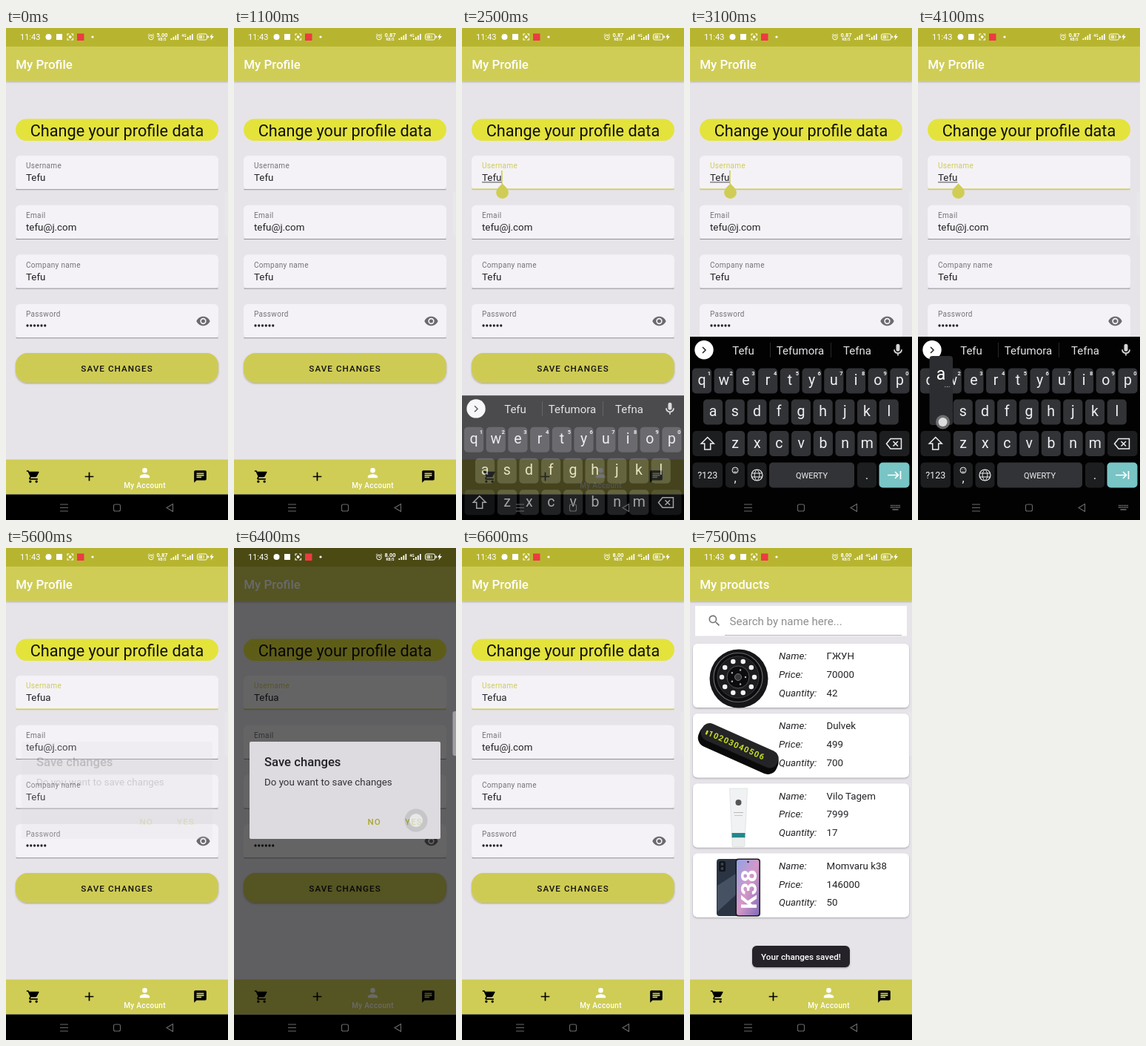
Write an HTML page that moves like this. It is 300 px wide and 663 px high and loops after 8 s.

```html
<!DOCTYPE html>
<html lang="en">
<head>
<meta charset="utf-8">
<style>
html, body { margin: 0; width: 100%; height: 100%; overflow: hidden; background: #000; }
svg { display: block; width: 100vw; height: 100vh; font-family: Roboto, "Noto Sans", sans-serif; }
</style>
</head>
<body>
<svg id="stage" viewBox="0 0 300 663"></svg>
<script>
const LOOP = 8000, STEP = 100;
const OLIVE = '#cfcd56', PAGE = '#e6e4e8', FIELD = '#f4f2f6', INK = '#232226';
const NAME = 'Tefu', TYPED = NAME + 'a';

const rect = (x, y, w, h, fill, r = 0, more = '') =>
  `<rect x="${x}" y="${y}" width="${w}" height="${h}" rx="${r}" fill="${fill}" ${more}/>`;
const circle = (x, y, r, fill, more = '') =>
  `<circle cx="${x}" cy="${y}" r="${r}" fill="${fill}" ${more}/>`;
const text = (x, y, size, fill, str, more = '') =>
  `<text x="${x}" y="${y}" font-size="${size}" fill="${fill}" ${more}>${str}</text>`;
const line = (d, color, width = 1, more = '') =>
  `<path d="${d}" fill="none" stroke="${color}" stroke-width="${width}" ${more}/>`;
const group = (id, body, more = '') => `<g id="${id}" ${more}>${body}</g>`;
const MID = 'text-anchor="middle"', MEDIUM = 'font-weight="500"', BOLD = 'font-weight="700"';
const CAPS = MEDIUM + ' letter-spacing="1.04"', SHADOW = 'filter="url(#shadow)"';

// 24-unit icons drawn 20 px wide around a centre
const ICONS = {
  eye: 'M12 4.5C7 4.5 2.73 7.61 1 12c1.73 4.39 6 7.5 11 7.5s9.27-3.11 11-7.5c-1.73-4.39-6-7.5-11-7.5zM12 17a5 5 0 1 1 0-10 5 5 0 0 1 0 10zm0-8a3 3 0 1 0 0 6 3 3 0 0 0 0-6z',
  cart: 'M7 18a2 2 0 1 0 0 4 2 2 0 0 0 0-4zM1 2v2h2l3.6 7.59-1.35 2.45C4.5 15.4 5.5 17 7 17h12v-2H7.42a.25.25 0 0 1-.22-.37l.9-1.63h7.45c.75 0 1.41-.41 1.75-1.03l3.58-6.49A1 1 0 0 0 20 4H5.21l-.94-2H1zm16 16a2 2 0 1 0 0 4 2 2 0 0 0 0-4z',
  plus: 'M19 13h-6v6h-2v-6H5v-2h6V5h2v6h6v2z',
  person: 'M12 12a4 4 0 1 0 0-8 4 4 0 0 0 0 8zm0 2c-2.67 0-8 1.34-8 4v2h16v-2c0-2.66-5.33-4-8-4z',
  chat: 'M20 2H4a2 2 0 0 0-2 2v18l4-4h14a2 2 0 0 0 2-2V4a2 2 0 0 0-2-2zM6 9h12v2H6V9zm8 5H6v-2h8v2zm4-6H6V6h12v2z',
  search: 'M15.5 14h-.8l-.3-.3a6.5 6.5 0 1 0-.7.7l.3.3v.8l5 5 1.5-1.5-5-5zm-6 0a4.5 4.5 0 1 1 0-9 4.5 4.5 0 0 1 0 9z',
  mic: 'M12 14a3 3 0 0 0 3-3V5a3 3 0 0 0-6 0v6a3 3 0 0 0 3 3zm5-3a5 5 0 0 1-10 0H5a7 7 0 0 0 6 6.92V21h2v-3.08A7 7 0 0 0 19 11h-2z'
};
const icon = (name, x, y, fill) =>
  `<path d="${ICONS[name]}" fill="${fill}" fill-rule="evenodd" transform="translate(${x - 10} ${y - 10}) scale(.8333)"/>`;

function field(i, label, value, id) {
  const y = 172 + 66.67 * i;
  return rect(13, y, 274, 46, FIELD, 6) +
    rect(13.5, y + 45.3, 273, .9, '#88868a', 0, `id="${id}Line"`) +
    text(27, y + 17.3, 10, '#747278', label, `letter-spacing=".33" id="${id}Label"`) +
    text(27, y + 34.2, 13.33, INK, value, `id="${id}Text"`);
}

function profilePage() {
  const dots = [0, 1, 2, 3, 4, 5].map(i => circle(29 + 4.75 * i, 401, 1.65, INK)).join('');
  return rect(13, 122.5, 274, 29.5, '#e4e33c', 14.75) +
    text(150, 146, 21.67, '#111', 'Change your profile data', MID) +
    field(0, 'Username', NAME, 'user') + field(1, 'Email', 'tefu@j.com', 'mail') +
    field(2, 'Company name', NAME, 'firm') + field(3, 'Password', '', 'pass') + dots +
    icon('eye', 266.5, 395, '#6c6a70') +
    rect(13, 438, 274, 40, '#cecb55', 16, SHADOW) +
    text(101.3, 463, 11.67, '#111', 'SAVE CHANGES', CAPS) +
    group('handle', `<path d="M54.5 209.5l6 6.2a8.4 8.4 0 1 1-12 0z" fill="${OLIVE}"/>`) +
    rect(0, 192, 1.6, 18, OLIVE, 0, 'id="cursor"') +
    rect(27, 207.5, 27.5, .8, INK, 0, 'id="compose"');
}

function wheel() {
  const ring = (r, color, width, n) => circle(65, 174, r, 'none',
    `stroke="${color}" stroke-width="${width}" stroke-linecap="round" pathLength="${n}" stroke-dasharray="0 1"`);
  return circle(66, 176, 39.5, '#161618') +
    circle(65, 174.5, 33, '#0c0c0e', 'stroke="#6a6a6e" stroke-width="1.2"') +
    circle(65, 174, 28, '#1d1d20', 'stroke="#3a3a3e"') + ring(22, '#f2f2f3', 6.5, 10) +
    circle(65, 174, 15, '#0c0c0e', 'stroke="#55565a"') + ring(10, '#b4b4b8', 2.5, 5) +
    circle(65, 174, 4.5, '#38383b', 'stroke="#77777b"');
}
const plate = () => `<g transform="translate(66 269) rotate(24)">` +
  rect(-57, -12, 115, 30, '#0a0a0b', 13) + rect(-56, -15, 112, 24, '#242426', 11) +
  rect(-49, -4, 2.5, 6, '#c6dc28', 1) +
  text(-4, 2, 11, '#c6dc28', '10203040506', MID + ' ' + BOLD + ' letter-spacing="1.2"') + '</g>';
const tube = () => '<path d="M53.5 324h24l-3 62H56.500z" fill="#f0f2f3" stroke="#dcdfe0" stroke-width=".8"/>' +
  circle(65.5, 343, 4, '#555') + rect(59, 356, 13, .8, '#aaa') + rect(60, 360, 11, .8, '#bbb') +
  rect(56.5, 384, 18, 6.500, '#23878d') + rect(57, 390.500, 17, 12, '#eceeee', 1.500, 'stroke="#d3d6d6" stroke-width=".6"');
const phones = () => rect(36, 419, 33, 77, '#2b3442', 4) + '<path d="M37 455l31-20v27l-31 28z" fill="#465264"/>' +
  rect(39, 422, 9, 14, '#11151c', 2.5) + circle(43.5, 426, 2, '#3b4350') + circle(43.5, 432, 2, '#3b4350') +
  rect(61.5, 418.5, 33.5, 78, '#17171c', 4) + rect(63, 420, 30.5, 75, 'url(#screen)', 3) +
  circle(78.5, 423, 1.2, '#222') +
  text(0, 0, 30, '#fff', 'K38', BOLD + ' text-anchor="middle" transform="translate(90 460) rotate(-90)"');

function productsPage() {
  const goods = [['ГЖУН', 70000, 42, wheel], ['Dulvek', 499, 700, plate],
    ['Vilo Tagem', 7999, 17, tube], ['Momvaru k38', 146000, 50, phones]];
  const cards = goods.map(([name, price, count, art], i) => {
    const y = 129 + 94.2 * i;
    const rows = [['Name:', name], ['Price:', price], ['Quantity:', count]].map(([key, value], j) =>
      text(120, y + 21.2 + 24.8 * j, 13.33, INK, key, 'font-style="italic"') +
      text(184.5, y + 21.2 + 24.8 * j, 13.33, INK, value)).join('');
    return rect(4, y, 292, 86, '#fff', 6, SHADOW) + art() + rows;
  }).join('');
  return rect(7, 78, 286, 40.5, '#fff') + icon('search', 33, 98, '#757575') +
    text(53.5, 104, 15.1, '#8e8e8e', 'Search by name here...') + rect(47, 117, 239, .8, '#a5a5a8') + cards +
    group('toast', rect(84, 536, 132, 29, '#252429', 6, SHADOW) +
      text(150, 554.7, 11.67, '#fff', 'Your changes saved!', MID + ' ' + MEDIUM));
}

function statusBar() {
  const bars = x => [0, 1, 2, 3].map(i => rect(x + 3 * i, 14 - 2 * i, 1.7, 2 + 2 * i, '#fff')).join('');
  return text(19, 16, 11, '#fff', '11:43') + circle(57.5, 12, 4, '#fff') + rect(68, 8, 8, 8, '#fff') +
    line('M83 10.5v-2.5h2.5M88 8h2.5v2.5M90.5 13.5v2.5h-2.5M85.5 16h-2.5v-2.5', '#fff', 1.1) +
    circle(86.7, 12, 1.9, '#fff') + rect(96, 7.5, 9.5, 9.5, '#ec3b43') + circle(117, 12, 1.6, '#fff') +
    circle(196, 12.5, 3.3, 'none', 'stroke="#fff"') +
    line('M196 10.5v2.2h1.6M191.8 9.6l2-1.7M200.2 9.6l-2-1.7', '#fff', .9) +
    text(211, 12, 7.5, '#fff', '', `${MID} ${BOLD} id="speed"`) +
    text(211, 17, 4.8, '#fff', 'KB/S', MID + ' ' + BOLD) + bars(222.5) +
    text(240.5, 11.5, 5, '#fff', '4G', MID + ' ' + BOLD) + bars(242) +
    rect(258.5, 8, 13, 8, 'none', 2, 'stroke="#fff"') + rect(272.5, 10.5, 1.5, 3, '#fff') +
    rect(260, 9.5, 5, 5, '#fff', .5, 'opacity=".55"') + text(265, 14.4, 6, '#fff', '33', MID) +
    '<path d="M279 7.5l-4 5h2.5l-1 4 4.5-5.5h-2.7z" fill="#fff"/>';
}

function keyboard() {
  const KEY = '#323336', DARK = '#1d1e20', GLYPH = '#f0f0f2';
  const key = (x, y, w, fill, body = '') => rect(x, y, w, 34, fill, 5) + body;
  const row = (letters, x0, y, digits) => [...letters].map((c, i) => {
    const x = x0 + 29.72 * i;
    return key(x - 13.1, y, 26.2, KEY, text(x, y + 22.8, 19.5, GLYPH, c, MID) +
      (digits ? text(x + 10, y + 9, 7.5, GLYPH, (i + 1) % 10, MID + ' ' + BOLD) : ''));
  }).join('');
  const words = [72, 149, 226].map((x, i) => text(x, 440, 15, '#e4e4e6', '', `${MID} id="word${i}"`)).join('');
  return rect(0, 416, 300, 247, '#020203') + circle(19, 433.7, 12.7, '#fff') +
    line('M17 430l4 4-4 4', '#222', 1.5) + words +
    rect(108, 424, .8, 20, '#333') + rect(190, 424, .8, 20, '#333') + icon('mic', 281, 434, '#d6d6d8') +
    row('qwertyuiop', 16, 458.5, true) + row('asdfghjkl', 31, 500.5) + row('zxcvbnm', 61, 543) +
    key(3.5, 543, 40.5, DARK, line('M23.7 551.5l8.5 8.5h-4.5v8h-8v-8h-4.5z', GLYPH, 1.5)) +
    key(256, 543, 40.5, DARK, line('M271 553.5h14.5v13.5h-14.5l-5.5-6.7zM274.500 557l6.500 6.500M281 557l-6.500 6.500', GLYPH, 1.5)) +
    key(3.5, 585.5, 40.5, DARK, text(23.7, 607, 12.5, GLYPH, '?123', MID)) +
    key(48, 585.5, 26, DARK, circle(61, 596, 4, 'none', `stroke="${GLYPH}"`) +
      line('M59 597.5q2 2 4 0M59.5 594.3v1M62.5 594.3v1', GLYPH, .9) + text(61, 612, 16, GLYPH, ',', MID)) +
    key(77.5, 585.5, 26, DARK, circle(90.5, 602.5, 7.5, 'none', `stroke="${GLYPH}" stroke-width="1.2"`) +
      line('M83 600h15M83 605h15M90.5 595c-4.5 4-4.5 11 0 15c4.5-4 4.5-11 0-15', GLYPH)) +
    key(107, 585.5, 115, KEY, text(164.5, 606.5, 11, GLYPH, 'QWERTY', MID)) +
    key(226, 585.5, 26, DARK, text(239, 608, 17, GLYPH, '.', MID)) +
    key(255.5, 585.5, 41, '#79c4c5', line('M267 602.5h14M277 598l4.5 4.5-4.5 4.5M284.5 597v11', '#fff', 1.7)) +
    group('popup', rect(15.5, 442, 31.5, 93, '#2c2d30', 4) +
      text(31, 474.3, 23, '#fff', 'a', MID) + text(39.5, 484, 10, '#ddd', '...', MID));
}

const stage = document.getElementById('stage');
stage.innerHTML = `<defs>
  <filter id="shadow" x="-10%" y="-20%" width="120%" height="150%"><feDropShadow dx="0" dy="1.2" stdDeviation="1" flood-opacity=".28"/></filter>
  <linearGradient id="screen" x1="0" y1="0" x2="1" y2="1"><stop stop-color="#8fa3e6"/><stop offset=".5" stop-color="#d598c8"/><stop offset="1" stop-color="#7f6cba"/></linearGradient>
  </defs>` +
  rect(0, 0, 300, 663, PAGE) + rect(0, 20, 300, 51.5, OLIVE, 0, SHADOW) + rect(0, 0, 300, 25, '#b7b530') +
  text(13.3, 54.8, 16.9, '#fff', '', MEDIUM + ' id="title"') +
  group('profile', profilePage()) + group('products', productsPage()) +
  rect(0, 581.5, 300, 47, OLIVE) +
  icon('cart', 37, 604.5, '#000') + icon('plus', 112.5, 604.5, '#000') +
  icon('person', 187.5, 599.5, '#fff') + icon('chat', 262.5, 604.5, '#000') +
  text(187.6, 620, 10, '#fff', 'My Account', `${MID} ${MEDIUM} letter-spacing=".33"`) +
  rect(0, 0, 300, 628.5, '#000', 0, 'id="dim"') +
  rect(0, 628.5, 300, 35, '#000') + group('keyboard', keyboard()) +
  line('M73 642h11M73 646.5h11M73 651h11', '#6a6a6a', 1.1) +
  rect(145.5, 642, 9, 9, 'none', 2, 'stroke="#6a6a6a" stroke-width="1.1"') +
  line('M225.5 641.5v10l-8.5-5z', '#6a6a6a', 1.1) +
  group('imeIcon', line('M271 643.5h13M271 646h13', '#777', 1.5, 'stroke-dasharray="1.6 .7"') + line('M273.5 649h8', '#777', 1.4)) +
  group('dialog', rect(21, 261, 258, 131, '#dddbdf', 2) +
    text(41, 294, 16.67, INK, 'Save changes', MEDIUM) + text(41, 319.5, 13.33, '#333137', 'Do you want to save changes') +
    text(180.5, 373, 11.67, '#aaa82c', 'NO', CAPS) + text(231, 373, 11.67, '#aaa82c', 'YES', CAPS)) +
  rect(295.5, 220, 8, 60, '#eceaee', 3, 'opacity=".45"') + statusBar() +
  group('touch', circle(0, 0, 9.5, '#808082', 'opacity=".8"') + circle(0, 0, 6, '#dcdcdc')) +
  group('ripple', circle(246, 367, 15.5, '#777', 'opacity=".22"') + circle(246, 367, 9, '#fff', 'opacity=".6"'));

const el = id => stage.querySelector('#' + id);
const show = (id, alpha) => el(id).setAttribute('opacity', Number(alpha));
const put = (id, str) => { if (el(id).textContent !== str) el(id).textContent = str; };
const progress = (t, from, to) => Math.min(1, Math.max(0, (t - from) / (to - from)));
const within = (t, from, to) => t >= from && t < to;
// start, end, x, y
const TOUCHES = [[2200, 2300, 120, 200], [4100, 4200, 33.5, 531], [4500, 4600, 222, 646], [5400, 5500, 258, 463]];

function draw(t) {
  const saved = t >= 7000, focused = t >= 2300, typed = t >= 4200;
  put('title', saved ? 'My products' : 'My Profile');
  put('speed', t < 800 ? '5.00' : t < 6000 ? '0.87' : '8.00');
  show('profile', !saved);
  show('products', saved);
  show('toast', progress(t, 6950, 7250));

  put('userText', typed ? TYPED : NAME);
  const width = el('userText').getComputedTextLength();
  const thickness = focused ? 1.7 : .9;
  el('userLabel').setAttribute('fill', focused ? OLIVE : '#747278');
  el('userLine').setAttribute('fill', focused ? OLIVE : '#88868a');
  el('userLine').setAttribute('y', 218.2 - thickness);
  el('userLine').setAttribute('height', thickness);
  el('cursor').setAttribute('x', 26.7 + width);
  el('compose').setAttribute('width', width);
  show('cursor', within(t, 2300, 3800) || within(t, 4200, 4800));
  show('compose', within(t, 2400, 4900));
  show('handle', within(t, 2400, 4200));

  const hidden = t < 4600 ? (1 - progress(t, 2358, 2808)) ** 3 : progress(t, 4550, 5000) ** 2;
  el('keyboard').setAttribute('transform', `translate(0 ${247 * hidden})`);
  show('keyboard', 1 - hidden);
  show('imeIcon', within(t, 2700, 4800));
  show('popup', within(t, 4100, 4200));
  (typed ? [TYPED, 'Tefuan', 'Tefual'] : [NAME, 'Tefumora', 'Tefna']).forEach((word, i) => put('word' + i, word));

  const leave = 1 - progress(t, 6400, 6600);
  show('dialog', progress(t, 5560, 5760) * leave);
  show('dim', .59 * progress(t, 5600, 5800) * leave);
  show('ripple', within(t, 6300, 6500));

  const touch = TOUCHES.find(([from, to]) => within(t, from, to));
  show('touch', !!touch);
  if (touch) el('touch').setAttribute('transform', `translate(${touch[2]} ${touch[3]})`);
}

const start = performance.now();
function tick() {
  const t = (performance.now() - start) % LOOP;
  draw(Math.floor(t / STEP) * STEP);
  requestAnimationFrame(tick);
}
tick();
</script>
</body>
</html>
```
